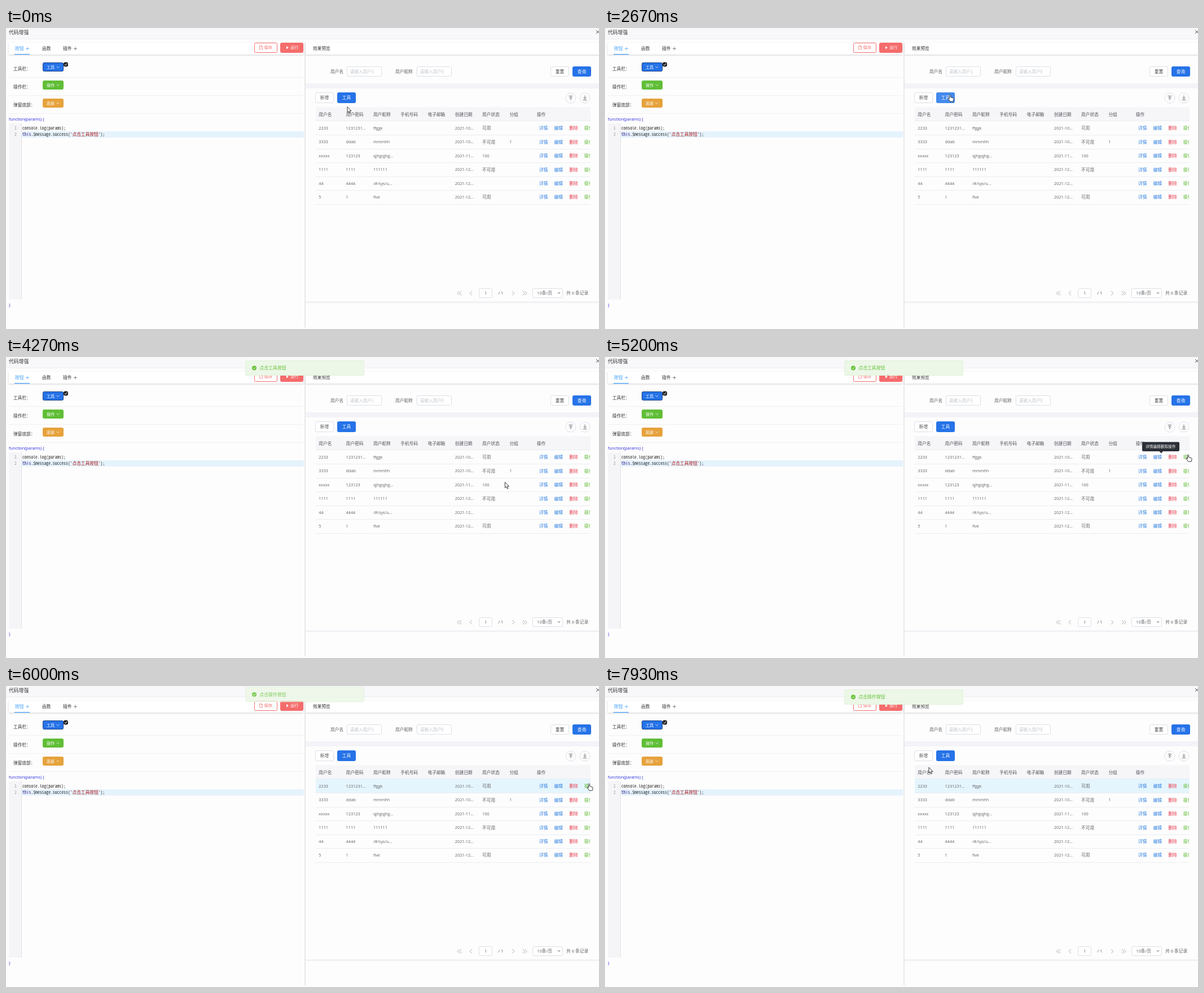
Recreate the animation shown at these times as an HTML page. Size 1051 by 533 pixels, loop 8000 ms.

```html
<!DOCTYPE html>
<html>
<head>
<meta charset="utf-8">
<title>代码增强</title>
<style>
  html, body { margin: 0; width: 100%; height: 100%; overflow: hidden; background: #fdfdfd; }
  svg { display: block; width: 1051px; height: 533px; }
  text { font-family: "Open Sans", "Noto Sans CJK SC", "Noto Sans CJK", sans-serif; white-space: pre; }
  .mono { font-family: "Noto Sans Mono CJK SC", "Liberation Mono", monospace; }
</style>
</head>
<body>
<svg id="stage" viewBox="0 0 1051 533"></svg>
<script>
const LOOP = 8000;
const BLUE = '#2673e8', HOVER = '#4389ee', GREEN = '#67c23a', RED = '#f56c6c', EDGE = '#dcdfe6';

// y is the vertical middle of the text
const text = (x, y, str, fill = '#606266', size = 7.7, attrs = '') =>
  `<text x="${x}" y="${(y + size * 0.37).toFixed(2)}" fill="${fill}" font-size="${size}" ${attrs}>${str}</text>`;
const rect = (x, y, w, h, fill, attrs = '') =>
  `<rect x="${x}" y="${y}" width="${w}" height="${h}" fill="${fill}" ${attrs}/>`;
const box = (x, y, w, h, fill = '#fff', edge = EDGE, id = '') =>
  rect(x + .5, y + .5, w - 1, h - 1, fill, `rx="2" stroke="${edge}" ${id && `id="${id}"`}`);
const line = (d, stroke, width = .8, attrs = '') =>
  `<path d="${d}" fill="none" stroke="${stroke}" stroke-width="${width}" ${attrs}/>`;
const rule = (x1, x2, y, stroke = '#ebedf1') => line(`M${x1} ${y}H${x2}`, stroke, 1);
const label = (x, y, str, fill = '#333') => text(x, y, str, fill, 7.7, 'font-weight="500"');
const plus = (x, y, stroke) => line(`M${x - 3} ${y}h6m-3-3v6`, stroke, .7);
const mono = (x, y, str) => text(x, y, str, '#222', 7.7, 'class="mono"');
const button = (x, y, w, h, str, fill, edge, ink, id) =>
  box(x, y, w, h, fill, edge, id) + text(x + w / 2, y + h / 2, str, ink, 7.7, 'text-anchor="middle"');

function header() {
  return rect(0, 0, 1051, 19, '#f8f8fa') + rule(0, 1051, 19.5, '#eeeef0')
    + text(5, 7.3, '代码增强', '#333', 8.8)
    + line('M1046 4l6 6m0-6l-6 6', '#555', 1);
}

function leftPane() {
  const menu = (y, name, caption, fill, edge) =>
    label(13, y + 3, name)
    + box(65, y - 8, 37, 16, fill, edge)
    + text(72, y, caption, '#fff', 7, 'font-weight="500"')
    + line(`M89.5 ${y - 1}l2.5 2.3 2.5-2.3`, '#fff', .7)
    + rule(5, 527, y + 18.5, '#f0f0f2');
  return rect(5, 26, 522, 21, '#fff', 'filter="url(#shadow)"')
    + text(16, 36.5, '按钮', '#409eff') + plus(38, 36.5, '#409eff') + rect(15, 46, 27, 1.2, '#409eff')
    + text(64, 36.5, '函数', '#333') + text(101, 36.5, '插件', '#333') + plus(123, 36.5, '#555')
    + box(440, 26, 41, 18, '#fff', RED)
    + line('M449.5 31.5h3.5l1.7 1.7v4.5h-5.2zM452.5 31.5v2h2', RED, .7)
    + text(457.5, 34.7, '保存', RED, 7.2)
    + box(486, 26, 41, 18, RED, RED)
    + '<path d="M497 32l4 2.7-4 2.7z" fill="#fff"/>' + text(504, 34.7, '运行', '#fff', 7.2)
    + menu(69, '工具栏：', '工具', BLUE, '#193f86')
    + box(102, 60.5, 8, 8, '#222', '#222') + line('M104 64.5l1.6 1.7 2.7-3.5', '#fff', 1)
    + menu(101, '操作栏：', '操作', '#60be37', '#60be37')
    + menu(133, '弹窗底部：', '底部', '#e6a23c', '#e6a23c')
    + text(5, 161, 'function(params) {', '#2a2ae0', 7.3)
    + rect(5, 169, 22, 312, '#f5f5f8') + rule(27, 27, 0) + line('M27.5 169V481', '#e3e3e6', 1)
    + rect(28, 183, 500, 11, '#e5f3fd')
    + text(15, 177.3, '1', '#999', 7.7, 'class="mono"') + text(15, 188.5, '2', '#999', 7.7, 'class="mono"')
    + mono(29, 177.3, 'console.log(params);')
    + mono(29, 188.5, `<tspan fill="#30107f">this</tspan>.$message.success(<tspan fill="#a11">'点击工具按钮'</tspan>);`)
    + text(5, 490, '}', '#2a2ae0', 7.3);
}

function form() {
  const field = (x, name, inputX, hint, id) =>
    text(x, 77.3, name) + box(inputX, 68, 62, 18)
    + `<clipPath id="${id}"><rect x="${inputX}" y="68" width="47" height="18"/></clipPath>`
    + text(inputX + 5.5, 77.3, hint, '#c0c4cc', 7.7, `clip-path="url(#${id})"`);
  const round = (x, icon) =>
    `<circle cx="${x}" cy="124" r="9" fill="#fff" stroke="${EDGE}"/>` + line(icon, '#606266', .9);
  return rect(531, 26, 520, 21, '#fff', 'filter="url(#shadow)"')
    + label(544, 36.5, '效果预览')
    + field(575, '用户名', 604, '请输入用户名', 'hintA')
    + field(690, '用户昵称', 728, '请输入用户昵称', 'hintB')
    + button(965, 68, 33, 18, '重置', '#fff', EDGE, '#444')
    + button(1004, 68, 33, 18, '查询', BLUE, BLUE, '#fff')
    + rect(531, 98, 520, 9, '#f3f3f8')
    + button(548, 114, 33, 19, '新增', '#fff', EDGE, '#555')
    + button(587, 114, 33, 19, '工具', BLUE, BLUE, '#fff', 'tool')
    + round(1001, 'M997.5 120.5h7M1001 128v-6m-2.7 2.7l2.7-2.7 2.7 2.7')
    + round(1026, 'M1022.5 127.5h7M1026 119.5v6m-2.7-2.7l2.7 2.7 2.7-2.7');
}

function table() {
  const heads = ['用户名', '用户密码', '用户昵称', '手机号码', '电子邮箱', '创建日期', '用户状态', '分组', '操作'];
  const rows = [
    ['2233', '1231231...', 'ffggk', '', '', '2021-10...', '可用'],
    ['3333', 'ddab', 'mmmhh', '', '', '2021-10...', '不可用', '1'],
    ['xxxxx', '123123', 'qjhgqjhg...', '', '', '2021-11...', '100'],
    ['1111', '1111', '111111', '', '', '2021-12...', '不可用'],
    ['44', '4444', '/#/sys/u...', '', '', '2021-12...'],
    ['5', '1', 'five', '', '', '2021-12...', '可用']
  ];
  const links = [['详情', '#2a7de1'], ['编辑', '#2a7de1'], ['删除', '#e5384a'], ['操作', '#5cb82f']];
  const columnX = i => 554.3 + i * 48.3;
  const cell = (str, i, y) => str ? text(columnX(i), y, str, '#606266', /^[ -~]+$/.test(str) ? 7.3 : 7.7) : '';
  return rect(549, 140, 487, 24.5, '#f6f6f9') + rule(549, 1036, 164.5)
    + heads.map((h, i) => text(columnX(i), 153, h, '#505257', 7.7, 'font-weight="500"')).join('')
    + rect(549, 165, 487, 24, '#e5f5fd', 'id="active"')
    + '<clipPath id="edge"><rect x="549" y="140" width="486" height="180"/></clipPath><g clip-path="url(#edge)">'
    + rows.map((row, r) => {
      const y = 177.3 + r * 24.45;
      return row.map((str, i) => cell(str, i, y)).join('')
        + links.map(([str, ink], i) => text(945 + i * 26.6, y, str, ink)).join('')
        + rule(549, 1036, Math.round(y + 12) + .5);
    }).join('') + '</g>';
}

function pager() {
  const chevron = (x, dir) => line(`M${x - 1.8 * dir} 466l${3.6 * dir} 3.7 ${-3.6 * dir} 3.7`, '#999');
  return chevron(801.8, -1) + chevron(805.6, -1) + chevron(824, -1)
    + box(838, 461, 24, 17) + text(848, 469.6, '1', '#555', 7.3)
    + text(872.5, 469.6, '/ 1', '#555', 7.3)
    + chevron(899, 1) + chevron(917.5, 1) + chevron(921.3, 1)
    + box(933, 461, 54, 17) + text(941, 469.6, '10条/页')
    + '<path d="M977 468h6l-3 3.4z" fill="#b5b8be"/>'
    + text(993, 469.6, '共 6 条记录')
    + rect(531, 484, 520, 3, '#f1f1f5')
    + line('M530 26V530', '#dcddd8', 1.2);
}

const toast = (id, str) => `<g id="${id}">`
  + box(424, 6, 211, 27, '#ecf7e7', '#e1f1da')
  + `<circle cx="440" cy="19.5" r="4" fill="${GREEN}"/>` + line('M438.2 19.6l1.4 1.5 2.4-2.9', '#fff', .9)
  + text(449.3, 19.5, str, GREEN, 7.85) + '</g>';

const tooltip = () => '<g id="tip">' + rect(952, 150.5, 66, 16.5, '#2b2f36', 'rx="2.2"')
  + '<path d="M982.5 167h6.6l-3.3 3.5z" fill="#2b2f36"/>'
  + text(958, 158.8, '详情编辑删除操作', '#fff', 6.7) + '</g>';

const cursors = () => '<g id="cursor" fill="#fff" stroke="#222" stroke-width=".9" stroke-linejoin="round">'
  + '<path id="arrow" d="M0 0v10l2.3-2 1.7 3.6 1.6-.7-1.6-3.6h3z"/>'
  + '<path id="hand" d="M-1 1q1-2 2 0v4l4.6 1.4q1.4.5 1 2.3l-1 3.9h-5.6l-3.2-4.8q0-1.6 1.4-1l.8 1z"/></g>';

document.getElementById('stage').innerHTML =
  '<filter id="shadow" x="-5%" y="-50%" width="110%" height="220%"><feDropShadow dx="0" dy="1.2" stdDeviation="1.6" flood-opacity=".16"/></filter>'
  + rect(0, 0, 1051, 533, '#fdfdfd')
  + header() + leftPane() + form() + table() + pager()
  + toast('toastTool', '点击工具按钮') + toast('toastAction', '点击操作按钮') + tooltip() + cursors();

const $ = id => document.getElementById(id);
const show = (id, visible) => $(id).setAttribute('visibility', visible ? 'visible' : 'hidden');
const progress = (t, start, length) => Math.min(1, Math.max(0, (t - start) / length));
const smooth = u => u * u * (3 - 2 * u);
const easeOut = u => 1 - (1 - u) ** 2.2;

// start, end, from, to, upward bend of the path
const moves = [
  [70, 520, [605, 139.5], [611.5, 117.5], 0],
  [3600, 4720, [611.5, 117.5], [1033.5, 172.5], -75],
  [7400, 7900, [1033.5, 172.5], [574, 144], 122]
];

function cursorAt(t) {
  const [start, end, from, to, bend] = moves.findLast(m => t >= m[0]) || moves[0];
  const u = smooth(progress(t, start, end - start));
  return [from[0] + (to[0] - from[0]) * u, from[1] + (to[1] - from[1]) * u - bend * 4 * u * (1 - u)];
}

function placeToast(id, t, enter, leave) {
  const shown = easeOut(progress(t, enter, 400)) * (1 - smooth(progress(t, leave, 330)));
  $(id).setAttribute('transform', `translate(0 ${-27 * (1 - shown)})`);
  $(id).setAttribute('opacity', shown);
}

function render(t) {
  const [x, y] = cursorAt(t);
  const overTool = x > 587 && x < 620 && y > 114 && y < 133;
  const overAction = x > 1024 && Math.abs(y - 177) < 7;
  $('cursor').setAttribute('transform', `translate(${x} ${y})`);
  show('hand', overTool || overAction);
  show('arrow', !overTool && !overAction);
  $('tool').setAttribute('fill', overTool ? HOVER : BLUE);
  $('tool').setAttribute('stroke', overTool ? HOVER : BLUE);
  show('active', t >= 5760);
  $('tip').setAttribute('opacity', progress(t, 4620, 200) * (1 - progress(t, 5560, 150)));
  placeToast('toastTool', t, 2760, 5430);
  placeToast('toastAction', t, 5780, LOOP);
}

const begin = performance.now();
function tick() {
  render((performance.now() - begin) % LOOP);
  requestAnimationFrame(tick);
}
tick();
</script>
</body>
</html>
```
